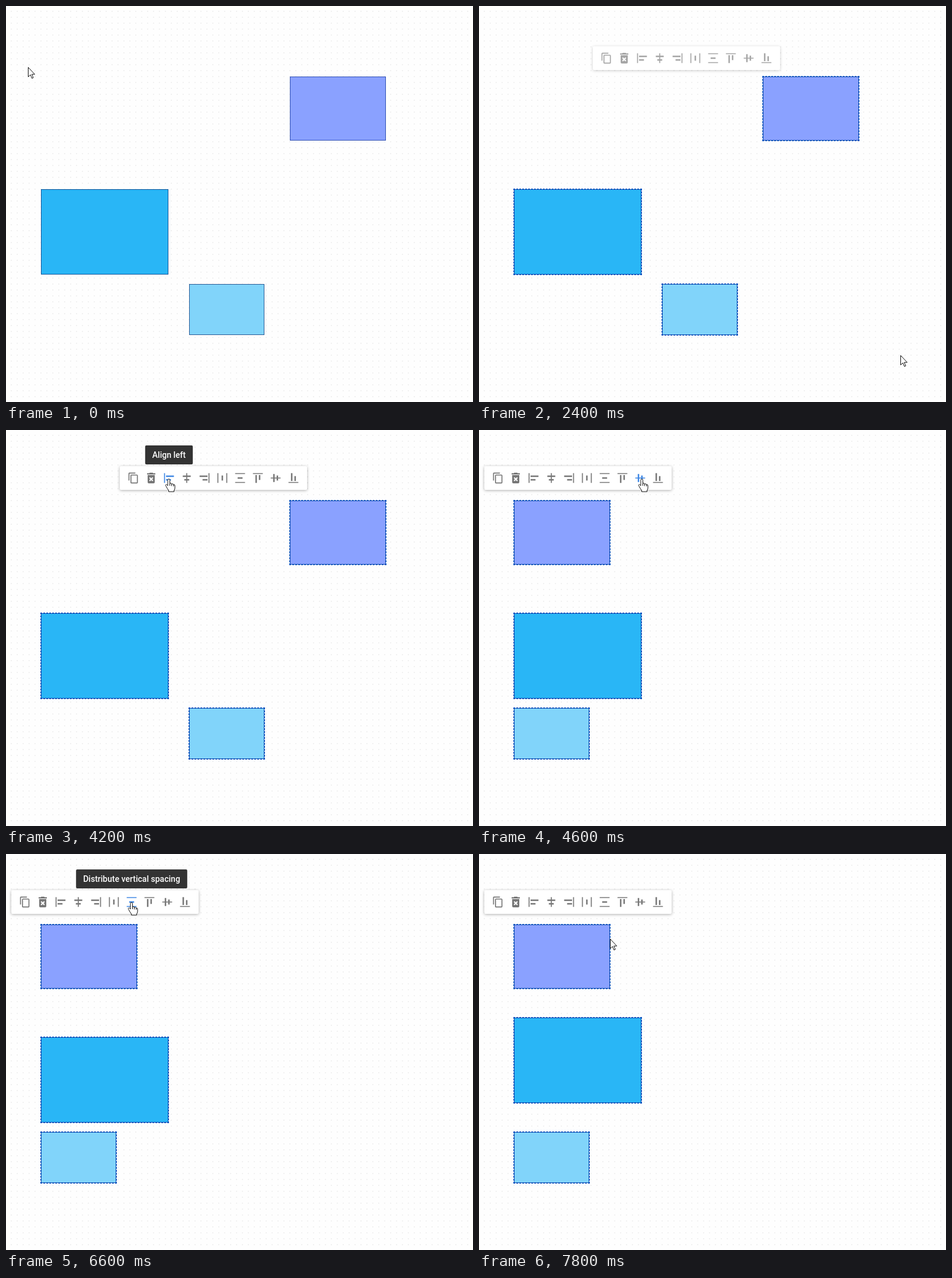
These frames come from a looping animation (788 px wide and 668 px high, 8 s). An HTML page with a canvas:

```html
<!DOCTYPE html>
<html lang="en">
<head>
<meta charset="utf-8">
<style>
  html, body { margin: 0; width: 100%; height: 100%; overflow: hidden; background: #fefefe; }
  canvas { display: block; }
</style>
</head>
<body>
<canvas id="stage" width="788" height="668"></canvas>
<script>
const stage = document.getElementById('stage');
const ctx = stage.getContext('2d');
const LOOP = 8000, STEP = 200;
const RELEASE = 2200, ALIGN = 4400, DISTRIBUTE = 6800;
const BAR = { width: 316, height: 40, top: 61, pitch: 30, inset: 23 };

const boxes = [
  { x: 479.5, y: 119.5, w: 161, h: 107, fill: '#8aa1ff', stroke: '#3050b4' },
  { x: 59.5, y: 309.5, w: 214, h: 143, fill: '#29b6f6', stroke: '#12559a' },
  { x: 309.5, y: 469.5, w: 126, h: 85, fill: '#81d4fa', stroke: '#2a5c96' }
];
const pointerStart = { x: 37, y: 103 };
const pointerMoves = [
  { from: 0, to: 300, x: 47, y: 100 },
  { from: 300, to: 1400, x: 699, y: 565 },
  { from: 1400, to: 1800, x: 711, y: 589 },
  { from: 2500, to: 3500, x: 275, y: 83 },
  { from: 5200, to: 6000, x: 212, y: 82 },
  { from: 7400, to: 7800, x: 221, y: 143 }
];
const tooltips = [
  { from: 3800, to: ALIGN, icon: 2, text: 'Align left' },
  { from: 6600, to: 7400, icon: 6, text: 'Distribute vertical spacing' }
];

// Icons live on a 24 unit grid; anchor runs from 0 (start) to 1 (end).
const alignBars = anchor => [
  [2 + 18 * anchor, 2, 2, 20],
  ...[16, 10].map((length, i) => [6 + anchor * (12 - length), 7 + 7 * i, length, 3])
];
const spreadBars = [[2, 2, 2, 20], [20, 2, 2, 20], [10.5, 7, 3, 10]];
const transpose = rects => rects.map(([x, y, w, h]) => [y, x, h, w]);
const toPath = rects => {
  const path = new Path2D();
  rects.forEach(r => path.rect(...r));
  return path;
};
const aligns = [0, 0.5, 1].map(alignBars);
const copyIcon = new Path2D('M19 21H8V7h11zM19 5H8a2 2 0 0 0-2 2v14a2 2 0 0 0 2 2h11a2 2 0 0 0 2-2V7a2 2 0 0 0-2-2zM16 1H4a2 2 0 0 0-2 2v14h2V3h12z');
const binIcon = new Path2D();
binIcon.addPath(
  new Path2D('M6 7h12v12a2 2 0 0 1-2 2H8a2 2 0 0 1-2-2zM5 4h3.5l1-1h5l1 1H19v2H5zM8.5 11.9l1.4-1.4 2.1 2.1 2.1-2.1 1.4 1.4-2.1 2.1 2.1 2.1-1.4 1.4-2.1-2.1-2.1 2.1-1.4-1.4 2.1-2.1z'),
  new DOMMatrix().translate(12, 12).scale(1.2).translate(-12, -12)
);
const icons = [
  copyIcon, binIcon,
  ...[...aligns, spreadBars, ...[spreadBars, ...aligns].map(transpose)].map(toPath)
];
const arrow = new Path2D('M.5.5v16l3.7-3.5 2.6 6 2.3-1-2.6-5.8h5z');
const hand = new Path2D('M-2 11V1.5a1.75 1.75 0 0 1 3.5 0V7q2.5-1 3 1 2.6-.8 3.2 1 2.3-.5 2.3 2v4q0 2-1.5 4v2h-9v-2q-2-2.5-4.7-7.5c-1.5-2.3.8-3.3 2-2z');
const knuckles = new Path2D('M1.5 7v4M4.5 8v3.5M7.7 9v3');

const clamp = v => Math.max(0, Math.min(1, v));
const smooth = p => p * p * (3 - 2 * p);

function pointerAt(t) {
  return pointerMoves.reduce((at, move) => {
    const p = smooth(clamp((t - move.from) / (move.to - move.from)));
    return { x: at.x + (move.x - at.x) * p, y: at.y + (move.y - at.y) * p };
  }, pointerStart);
}

function layoutAt(t) {
  const left = Math.min(...boxes.map(b => b.x));
  const placed = boxes.map(b => ({ ...b, x: t >= ALIGN ? left : b.x }));
  if (t >= DISTRIBUTE) {
    const [first, mid, last] = placed;
    mid.y = (first.y + first.h + last.y - mid.h) / 2;
  }
  return placed;
}

function drawGrid() {
  ctx.fillStyle = '#fefefe';
  ctx.fillRect(0, 0, stage.width, stage.height);
  ctx.fillStyle = '#e4e4e4';
  for (let x = 8.3; x < stage.width; x += 10)
    for (let y = 8.3; y < stage.height; y += 10) ctx.fillRect(x, y, 1.4, 1.4);
}

// Gaps are adjusted so that every side starts and ends with a full dash.
function dashedSide(x, y, dx, dy) {
  const length = dx + dy, count = Math.round((length + 2) / 5);
  ctx.setLineDash([3, (length - 3 * count) / (count - 1)]);
  ctx.beginPath();
  ctx.moveTo(x, y);
  ctx.lineTo(x + dx, y + dy);
  ctx.stroke();
  ctx.setLineDash([]);
}

function drawBox({ x, y, w, h, fill, stroke }, selected) {
  ctx.lineWidth = 1;
  ctx.fillStyle = fill;
  ctx.strokeStyle = selected ? '#1552b4' : stroke;
  ctx.fillRect(x, y, w, h);
  ctx.strokeRect(x, y, w, h);
  if (!selected) return;
  ctx.strokeStyle = '#0d55c4';
  for (const side of [-1, 1]) {
    dashedSide(x - 1.5, side < 0 ? y - 1 : y + h + 1, w + 3, 0);
    dashedSide(side < 0 ? x - 1 : x + w + 1, y - 1.5, 0, h + 3);
  }
}

function drawMarquee(t) {
  if (t < 400 || t >= RELEASE) return;
  const { x, y } = pointerAt(t - 90);
  ctx.strokeStyle = '#4a8fe0';
  ctx.lineWidth = 1;
  ctx.strokeRect(47.5, 100.5, Math.round(x) - 48, Math.round(y) - 101);
}

function drawToolbar(t, left, hovered) {
  const p = clamp((t - (t < ALIGN ? 2270 : ALIGN)) / 200);
  if (!p) return;
  ctx.save();
  ctx.translate(left, BAR.top + Math.round(20 * (1 - p)));
  ctx.shadowColor = `rgba(0,0,0,${0.32 * p})`;
  ctx.shadowBlur = 5;
  ctx.shadowOffsetY = 1;
  ctx.fillStyle = '#fff';
  ctx.beginPath();
  ctx.roundRect(0, 0, BAR.width, BAR.height, 2);
  ctx.fill();
  ctx.shadowColor = 'transparent';
  ctx.globalAlpha = p;
  icons.forEach((icon, i) => {
    ctx.save();
    ctx.translate(BAR.inset + i * BAR.pitch, BAR.height / 2);
    ctx.scale(20 / 24, 20 / 24);
    ctx.translate(-12, -12);
    ctx.fillStyle = i === hovered ? '#4088e4' : '#777';
    ctx.fill(icon, i < 2 ? 'evenodd' : 'nonzero');
    ctx.restore();
  });
  ctx.restore();
}

function drawTooltip({ icon, text }, left) {
  ctx.font = '500 14px Roboto, sans-serif';
  ctx.textAlign = 'center';
  const center = left + BAR.inset + icon * BAR.pitch;
  const width = ctx.measureText(text).width + 24;
  ctx.fillStyle = '#333';
  ctx.beginPath();
  ctx.roundRect(center - width / 2, 26, width, 32, 2);
  ctx.fill();
  ctx.fillStyle = '#fff';
  ctx.fillText(text, center, 47);
}

function drawPointer({ x, y }, shape) {
  ctx.save();
  ctx.translate(Math.round(x), Math.round(y));
  ctx.fillStyle = '#fff';
  ctx.strokeStyle = '#111';
  ctx.lineWidth = 1;
  ctx.fill(shape);
  ctx.stroke(shape);
  if (shape === hand) ctx.stroke(knuckles);
  ctx.restore();
}

function draw(t) {
  const placed = layoutAt(t), pointer = pointerAt(t);
  const right = Math.max(...placed.map(b => b.x + b.w + 1));
  const minX = Math.min(...placed.map(b => b.x));
  const left = Math.round((minX + right - BAR.width) / 2 - 0.5);
  const onToolbar = t > 2400 && Math.abs(pointer.x - left - BAR.width / 2) < BAR.width / 2
    && Math.abs(pointer.y - BAR.top - BAR.height / 2) < BAR.height / 2;
  // The hover colour trails the pointer slightly.
  const hovered = onToolbar ? Math.round((pointerAt(t - 120).x - left - BAR.inset) / BAR.pitch) : -1;

  drawGrid();
  placed.forEach(box => drawBox(box, t >= RELEASE));
  drawMarquee(t);
  drawToolbar(t, left, hovered);
  tooltips.filter(tip => t >= tip.from && t < tip.to).forEach(tip => drawTooltip(tip, left));
  drawPointer(pointer, onToolbar ? hand : arrow);
}

function tick() {
  draw(Math.floor(performance.now() % LOOP / STEP) * STEP);
  requestAnimationFrame(tick);
}
tick();
</script>
</body>
</html>
```
